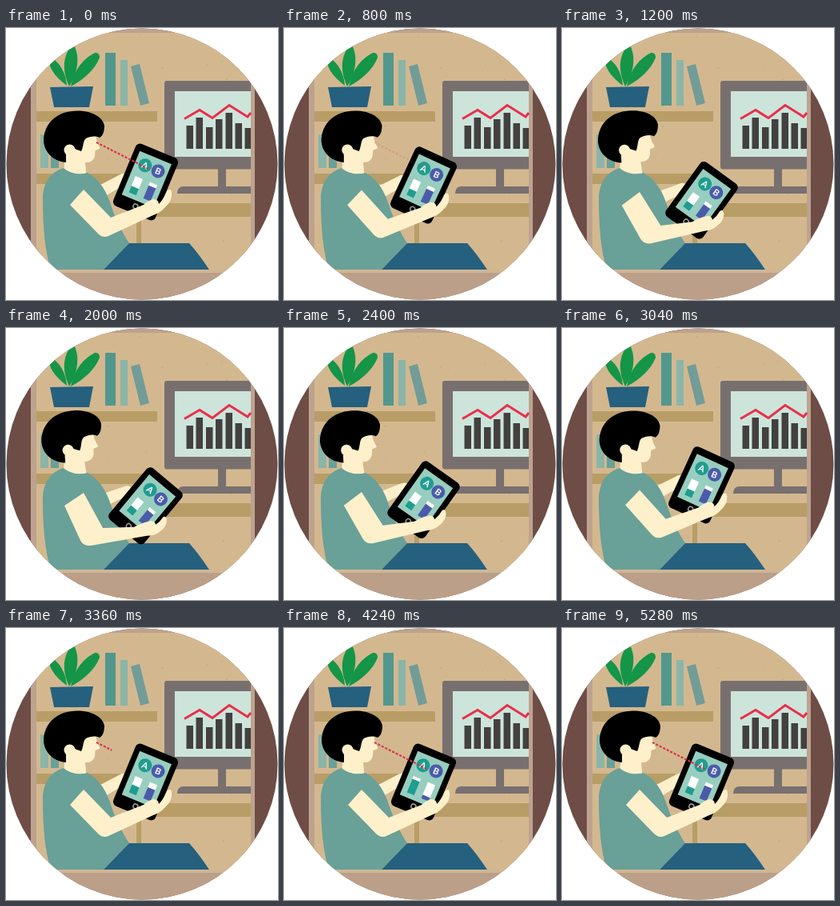
Write an HTML page that moves like this. It is 340x340 px and loops after 5.76 s.

```html
<!DOCTYPE html>
<html lang="en">
<head>
<meta charset="utf-8">
<title>Reading charts on a tablet</title>
<style>
  html, body { margin: 0; width: 100%; height: 100%; overflow: hidden; background: #fff; }
  svg { display: block; width: 100vw; height: 100vh; }
  text { font: bold 11px Lato, sans-serif; fill: #fff; text-anchor: middle; }
  .skin { fill: #fdf0cb; }
  .wood { fill: #b89d66; }
  .navy { fill: #25607f; }
  .teal { fill: #69a098; }
  .pale { fill: #8ab5a8; }
  .grey { fill: #78706f; }
</style>
</head>
<body>
<svg viewBox="0 0 340 340">
  <clipPath id="disc"><circle cx="170" cy="170" r="169.5"/></clipPath>
  <g clip-path="url(#disc)">
    <path fill="#6d4d45" d="M0 0H340V340H0Z"/>
    <path fill="#bda28e" d="M31 0H311V340H31Z"/>
    <path fill="#d3b88f" d="M38 6H306V303H38Z"/>
    <path fill="#cfb694" d="M38 302H306V306H38Z"/>
    <path fill="#bb9f88" d="M0 306H340V340H0Z"/>
    <g id="specks" fill="#a88b62" opacity=".55"></g>

    <path class="wood" d="M38 104H189V117H38ZM38 182H189V195H38ZM163 219H306V236H163ZM163 236H169V269H163Z"/>
    <path fill="#52978d" d="M124 31H137V97H124Z"/>
    <path fill="#729c98" d="M156 48L167 45L179 94L168 97Z"/>
    <path class="teal" d="M56 133H66V175H56Z"/>
    <path class="pale" d="M143 40H152V97H143ZM43 133H53V175H43Z"/>

    <g fill="#149548">
      <path d="M76 72C75 58 68 42 54 36C52 48 60 60 76 72Z"/>
      <path d="M79 73C70 54 70 34 84 20C93 34 90 56 79 73Z"/>
      <path d="M81 73C85 52 97 38 111 31Q117 30 117 37C111 52 98 64 81 73Z"/>
    </g>
    <path class="navy" d="M55 74L109 73L104 99H60Z"/>

    <g>
      <path class="grey" d="M201 66H306V176.500H201Q198 176.500 198 173V69Q198 66 201 66ZM265 176H275V198H306V207H214Q214 198 222 198H265Z"/>
      <path fill="#cde4db" d="M211 79H306V161H211Z"/>
      <path fill="#434040" d="M225.500 122h8.500v29h-8.500zM237.500 112h8.500v39h-8.500zM250 124h8.500v27h-8.500zM262 114h8.500v37h-8.500zM274.500 106h8.500v45h-8.500zM286.500 119h8.500v32h-8.500zM298.500 125h7.500v26h-7.500z"/>
      <path fill="none" stroke="#e8304a" stroke-width="3" d="M223 113.500L242 102.500L258 112.500L279 96.500L302 111L306 106"/>
    </g>

    <path id="backArm" class="skin"/>
    <g id="head">
      <path class="skin" d="M85 146L97 134H112.500C112.500 141 116 147 117.500 150C116 152 113 152 111.500 153L111 160C109 167 104 168.500 99 168L101 190H71L74 160Z"/>
      <path d="M75 168C56 166 47 152 47 140C48 118 65 103.500 89 103.500C107 103.500 121 111 123 122C123 129 121 135 117 137C111 134 104 136 100 138C96 141 97 149 94 154L83 150L75 158Z"/>
      <circle class="skin" cx="79.500" cy="152.500" r="7"/>
    </g>
    <path class="teal" d="M72 175C80 182 92 184 102 181C118 190 126 205 131 221C137 239 146 257 154 269L122 302H56C49 280 46 250 46 214C46 193 56 180 72 175Z"/>
    <path class="navy" d="M122 302L154 269H229Q240 281 254 302Z"/>

    <g id="tablet">
      <rect x="-28.500" y="-42" width="57" height="84" rx="6"/>
      <rect x="-21.500" y="-33" width="43" height="59" fill="#97cebf"/>
      <circle cy="33" r="3" fill="none" stroke="#999" stroke-width="1.5"/>
      <circle cx="-8.500" cy="-19" r="8.500" fill="#1f9d8f"/>
      <circle cx="9.200" cy="-18.500" r="8.500" fill="#4a5ca8"/>
      <text x="-8.500" y="-15">A</text>
      <text x="9.200" y="-14.500">B</text>
      <path fill="#fff" d="M-14.500 -2h10v22h-10zM5 -2h10v22h-10z"/>
      <rect id="barA" x="-14.500" width="10" fill="#1f9d8f"/>
      <rect id="barB" x="5" width="10" fill="#4a5ca8"/>
    </g>
    <path id="frontArm" class="skin"/>
    <line id="gaze" x1="113" y1="143" stroke="#d9304f" stroke-width="2.2" stroke-dasharray="3 2"/>
  </g>
</svg>
<script>
const LOOP = 5760, STEP = 80;
const $ = id => document.getElementById(id);
const set = (id, attrs) => { for (const k in attrs) $(id).setAttribute(k, attrs[k]); };
const mix = (a, b, p) => a + (b - a) * p;
const span = (t, from, to) => Math.min(1, Math.max(0, (t - from) / (to - from)));
const ease = u => u * u * (3 - 2 * u);

// Blends two paths that share the same commands.
function mixPath([a, b], p) {
  const ends = b.match(/-?[\d.]+/g);
  let i = 0;
  return a.replace(/-?[\d.]+/g, n => mix(+n, +ends[i++], p).toFixed(2));
}

const BACK_ARM = [
  'M118 196L141 184Q147 180 151 183L153 193L126 209Z',
  'M122 207L146 199Q152 196 156 199L156 208L130 220Z'
];
const FRONT_ARM = [
  'M80 221L97 202L131 237L172 221Q180 214 185 214Q191 215 191 220Q197 214 201 204Q207 199 207 207Q208 216 199 224Q193 231 184 234L128 260Q121 263 115 257Z',
  'M73 222L97 206L121 250L160 249Q172 243 179 242Q186 240 187 246Q193 242 196 237Q200 234 201 241Q200 250 192 255Q186 260 176 260L106 272Q97 273 93 266Z'
];

function drawBar(id, level) {
  set(id, { y: 20 - 22 * level, height: 22 * level });
}

function draw(time) {
  const t = Math.floor(time % LOOP / STEP) * STEP;
  const lowered = ease(span(t, 600, 1480)) * (1 - ease(span(t, 1920, 3360)));

  set('head', { transform: `rotate(${-4 * lowered} 82 180)` });
  set('tablet', { transform: `translate(174.5 ${mix(192.5, 222.5, lowered)}) rotate(${mix(22.5, 40, lowered)})` });
  set('backArm', { d: mixPath(BACK_ARM, lowered) });
  set('frontArm', { d: mixPath(FRONT_ARM, lowered) });

  const returning = t >= 2000;
  const reach = returning ? span(t, 3200, 3760) : 1;
  set('gaze', {
    x2: mix(113, 180, reach),
    y2: mix(143, 177, reach),
    opacity: returning ? +(reach > 0) : 1 - span(t, 400, 880)
  });

  // The two bars trade places, then settle back to their resting levels.
  const swap = span(t, 3280, 3840) * (1 - span(t, 3840, 5280));
  drawBar('barA', mix(.4, 1, swap));
  drawBar('barB', mix(.8, 0, swap));
}

let seed = 7;
const random = () => (seed = seed * 16807 % 2147483647) / 2147483647;
for (let i = 0; i < 45; i++) {
  const x = 40 + random() * 262, y = 10 + random() * 288;
  $('specks').innerHTML += `<circle cx="${x}" cy="${y}" r="${.3 + random() * .4}"/>`;
}

function tick() {
  draw(performance.now());
  requestAnimationFrame(tick);
}
tick();
</script>
</body>
</html>
```
